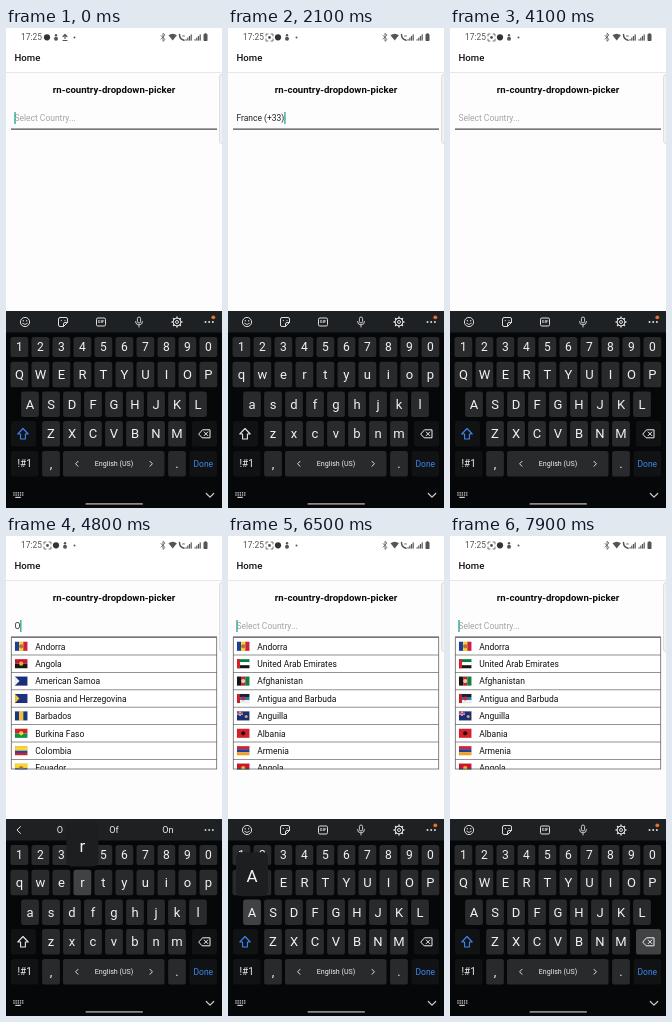
Animation of 216x480 px, one loop 8 s. Source, as an HTML page:

```html
<!DOCTYPE html>
<html lang="en">
<head>
<meta charset="utf-8">
<title>Country picker</title>
<style>
html, body { margin: 0; width: 100%; height: 100%; overflow: hidden; background: #fff; }
svg { display: block; width: 216px; height: 480px; font-family: Roboto, "Noto Sans", sans-serif; }
</style>
</head>
<body>
<svg id="stage" viewBox="0 0 216 480"></svg>
<script>
const LOOP = 8000;
const stage = document.getElementById('stage');
const pen = document.createElement('canvas').getContext('2d');

// Flags: direction, stripe colours, then marks: * disc, + cross, < hoist triangle, | hoist bar
const COUNTRIES = [
  ['Andorra', 'v 1a3fa0 f7d51d d02040 *b8703c'],
  ['United Arab Emirates', 'h 00843d ffffff 151515 |d8202c'],
  ['Afghanistan', 'v 151515 c8202c 10803c *e8c8b8'],
  ['Antigua and Barbuda', 'h 202028 2878b8 f0f0f0 |c8202c *b83040'],
  ['Anguilla', 'h 182f78 jack .e8a050'],
  ['Albania', 'h d8202c *281010'],
  ['Armenia', 'h d8202c 2040a0 f0a020'],
  ['Angola', 'h cc1530 181818 *e8b030'],
  ['Antarctica', 'h 3a9ad8 *ffffff'],
  ['Argentina', 'h 78b4e0 ffffff 78b4e0 *f0b840'],
  ['American Samoa', 'h 182f78 <f0f0f0'],
  ['Bosnia and Herzegovina', 'h 203080 <f0c820'],
  ['Barbados', 'v 183878 f0c030 183878'],
  ['Burkina Faso', 'h d8202c 109048 *f0d030'],
  ['Central African Republic', 'h 183878 ffffff 289040 f0d030'],
  ['Switzerland', 'h d8202c +ffffff'],
  ['Colombia', 'h f7d020 f7d020 2040a0 d0202c'],
  ['Ecuador', 'h f7d51d f7d51d 2050b0 d8202c *a87848'],
  ['Finland', 'h ffffff +203080'],
  ['Fiji', 'h 68b8e0 jack .ffffff'],
  ['Falkland Islands (Malvinas)', 'h 182f78 jack .ffffff'],
  ['France', 'v 2048a0 ffffff e02838'],
  ['United Kingdom of Great Britain and Northern Ireland', 'h 203080 +ffffff ~d8203c'],
  ['Georgia', 'h ffffff +e02030'],
  ['French Guiana', 'v 2048a0 ffffff e02838'],
  ['Equatorial Guinea', 'h 309a30 ffffff d8202c <2870c0'],
  ['South Georgia and the South Sandwich Islands', 'h 182f78 jack .b0c0a0'],
  ['British Indian Ocean Territory', 'h c8c8c8 ?'],
  ['South Africa', 'h d8303c 108050 203080 <181818']
];

const SUGGEST = {
  A: ['A', 'And', 'Abe'], An: ['An', 'And', 'Any'], Anc: ['Anc', 'Ancient', 'Anchor'],
  Ance: ['Ance', 'Ancestor', 'Ancestry'], And: ['And', 'Andy', 'Android'],
  Ando: ['Andorra', '@flag', ''], F: ['F', 'For', 'From'], Fr: ['Fr', 'From', 'Friday'],
  Fran: ['Fran', 'France', 'Frank'], Franc: ['Franc~e', 'France~s', 'Fran~c'],
  France: ['France', 'Frances', 'French'], O: ['O', 'Of', 'On'], Or: ['Or', 'Order', 'Ort']
};

const PICKED = 'France (+33)';
// time, text, caret, pressed key, list closed, words shown instead
const STEPS = [
  [0, '', 1, '', 1], [100, '', 0, '', 1],
  [800, '', 1, 'a', 1], [900, 'A', 1, ''], [1000, 'A', 1, 'n'],
  [1100, 'An', 1, '', 0, SUGGEST.A], [1200, 'An', 1, 'c', 0, ['A~ ', 'And', 'Abe~r']],
  [1300, 'Anc', 1, ''], [1400, 'Anc', 1, 'e'], [1500, 'Ance', 1, ''],
  [2000, PICKED, 1, '', 1], [2600, PICKED, 0, '', 1],
  [2900, 'France (+3', 1, '<'], [3000, 'France (', 1, '<'], [3100, 'France', 1, '<'],
  [3200, 'Franc', 1, '<'], [3300, 'Fran', 1, '<'], [3400, 'Fr', 1, '<'], [3500, 'F', 1, '<'],
  [3600, '', 1, '<', 1], [3800, '', 1, '', 1], [4100, '', 0, '', 1],
  [4500, '', 1, 'o', 1], [4600, 'O', 1, ''], [4800, 'O', 1, 'r'], [4900, 'Or', 1, ''],
  [5700, 'Or', 0, ''], [6000, 'Or', 1, '<'], [6100, 'O', 1, '<'], [6200, '', 1, '<'],
  [6300, '', 1, ''], [6500, '', 1, 'a'], [6600, 'A', 1, ''], [6700, 'A', 1, 'n'],
  [6800, 'An', 1, ''], [6900, 'An', 1, 'd'], [7000, 'And', 1, ''], [7100, 'And', 1, 'o'],
  [7200, 'Ando', 1, ''], [7400, 'And', 1, '<'], [7500, 'An', 1, '<'], [7600, 'A', 1, '<'],
  [7700, '', 1, '<']
];

const rect = (x, y, w, h, fill, more = '') =>
  `<rect x="${x}" y="${y}" width="${w}" height="${h}" fill="${fill}" ${more}/>`;
const disc = (x, y, r, fill) => `<circle cx="${x}" cy="${y}" r="${r}" fill="${fill}"/>`;
const line = (d, color, w = 1, fill = 'none') =>
  `<path d="${d}" fill="${fill}" stroke="${color}" stroke-width="${w}" stroke-linecap="round" stroke-linejoin="round"/>`;
const label = (s, x, cy, size, fill, anchor = 'start', more = '') =>
  `<text x="${x}" y="${cy + size * .355}" font-size="${size}" fill="${fill}" text-anchor="${anchor}" xml:space="preserve" ${more}>${s}</text>`;

function widthOf(s, size) {
  pen.font = `${size}px Roboto, "Noto Sans", sans-serif`;
  return pen.measureText(s).width;
}

function cross(x, y, w, h, color, t) {
  return rect(x + w / 2 - t / 2, y, t, h, color) + rect(x, y + h / 2 - t / 2, w, t, color);
}

function flag(spec, x, cy) {
  const w = 12.4, h = 9, y = cy - h / 2, parts = spec.split(' ');
  const bands = parts.filter(p => /^[0-9a-f]{6}$/.test(p));
  const n = bands.length;
  let out = bands.map((c, i) => parts[0] === 'v'
    ? rect(x + i * w / n, y, w / n, h, '#' + c)
    : rect(x, y + i * h / n, w, h / n, '#' + c)).join('');
  for (const p of parts.slice(1)) {
    const c = '#' + p.slice(1);
    if (p === 'jack') out += cross(x, y, 6, 4.5, '#fff', 1.8) + cross(x, y, 6, 4.5, '#d8203c', .8);
    else if (p[0] === '*') out += disc(x + w / 2, cy, 2.1, c);
    else if (p[0] === '.') out += disc(x + 9.2, cy + .5, 1.5, c);
    else if (p[0] === '+') out += cross(x, y, w, h, c, 2.4);
    else if (p[0] === '~') out += line(`M${x} ${y}l${w} ${h}m0 ${-h}l${-w} ${h}`, '#fff', .8) + cross(x, y, w, h, c, 1.3);
    else if (p[0] === '<') out += `<path d="M${x} ${y}l4.5 4.5l-4.5 4.5z" fill="${c}"/>`;
    else if (p[0] === '|') out += rect(x, y, 3, h, c);
    else if (p === '?') out += label('?', x + w / 2, cy, 7, '#777', 'middle');
  }
  return out + rect(x, y, w, h, 'none', 'stroke="#0002" stroke-width=".4"');
}

function statusBar(t) {
  const g = '#555', late = t >= 200;
  const x = late ? 50 : 41;
  let out = label('17:25', 15, 9.5, 8.4, g);
  if (late) out += line('M38 8v-2h2m3 0h2v2m0 3v2h-2m-3 0h-2v-2', g, .8) + disc(41.5, 9.5, 1.4, g);
  out += disc(x, 9.3, 3.1, '#333');
  out += disc(x + 9, 7.2, 1.2, g) + disc(x + 9, 10.7, 2, g);
  if (!late) out += line('M59 10.5v-4m-2 2l2-2l2 2M57 12.5h4', g, 1.2);
  out += disc(68.5, 9.5, 1, g);
  out += line('M155 7.5l4 4l-2 1.8v-8l2 1.8l-4 4', g, .8);
  out += `<path d="M162.5 7.3q4.2-3.3 8.4 0l-4.2 5.2z" fill="${g}"/>`;
  out += line('M173.5 6.5q0 4.5 4.5 5.8', g, 1.5) + label('w', 176, 7.5, 4, g);
  const bars = bx => [0, 1, 2, 3].map(i => rect(bx + i * 1.7, 11.2 - i * 1.6, 1.2, 1.4 + i * 1.6, g)).join('');
  out += bars(179.5) + bars(188.5);
  return out + rect(197.5, 6, 4, 7, g, 'rx=".7"') + rect(198.6, 5.2, 1.8, 1, g);
}

function countryList(text) {
  const top = 101.6, bottom = 233;
  const rows = COUNTRIES.filter(c => c[0].toLowerCase().includes(text.toLowerCase()));
  if (!rows.length) return '';
  let y = top, out = '';
  for (const [name, spec] of rows) {
    if (y >= bottom - 1) break;
    const cut = name.length > 46 ? name.lastIndexOf(' ') : name.length;
    const two = cut < name.length, h = two ? 27.2 : 17.4;
    out += flag(spec, 9, y + h / 2) + label(name.slice(0, cut), 29.2, y + 9, 8.5, '#111');
    if (two) out += label(name.slice(cut + 1), 29.2, y + 19, 8.5, '#111');
    y += h;
    out += rect(5, y - .4, 206, .8, '#777');
  }
  const end = Math.min(y, bottom);
  return `<clipPath id="box"><rect x="4" y="101" width="208" height="${end - 100.5}"/></clipPath>`
    + `<g clip-path="url(#box)">${rect(5, top, 206, end - top, '#fff')}${out}</g>`
    + rect(5.3, top, 205.4, end - top, 'none', 'stroke="#666" stroke-width=".8"');
}

function field(text, caret, closed) {
  const size = 8.5, x = 8.4, w = widthOf(text, size);
  let out = text ? label(text, x, 90, size, '#222') : label('Select Country...', x, 90, size, '#a4a4a4');
  if (text === 'An' || text === 'Or') out += rect(x, 94.2, w, .7, '#222');
  if (caret) out += rect(x + w, 84, 1.2, 12, '#159a8c');
  out += rect(5, 100.6, 206, 1, '#222');
  return closed ? out : out + countryList(text);
}

function iconBar() {
  const c = '#ddd';
  const ring = (x, r) => `<circle cx="${x}" cy="294" r="${r}" fill="none" stroke="${c}" stroke-width="1"/>`;
  const teeth = Array.from({ length: 8 }, (_, i) => {
    const a = i * Math.PI / 4;
    return `M${171 + 4 * Math.cos(a)} ${294 + 4 * Math.sin(a)}L${171 + 5 * Math.cos(a)} ${294 + 5 * Math.sin(a)}`;
  }).join('');
  return ring(19, 4.6) + disc(17.3, 292.7, .7, c) + disc(20.7, 292.7, .7, c) + line('M16.6 295.4q2.4 2.5 4.8 0', c, .9)
    + line('M54 289.5h6q1.5 0 1.5 1.5v3.5l-4 4h-3.5q-1.5 0-1.5-1.5v-6q0-1.5 1.5-1.5M61.5 294.5h-2.5q-1.5 0-1.5 1.5v2.5', c)
    + disc(55.3, 292.6, .6, c) + disc(59, 292.6, .6, c)
    + rect(90.5, 290, 9, 8, 'none', `rx="1.3" stroke="${c}"`) + label('GIF', 95, 294, 4.2, c, 'middle', 'font-weight="700"')
    + rect(131.4, 289, 3.2, 6, 'none', `rx="1.6" stroke="${c}" stroke-width=".9"`)
    + line('M129.5 293.5q0 3.4 3.5 3.4t3.5-3.4M133 297v2', c, .9)
    + ring(171, 4) + ring(171, 1.5) + line(teeth, c, 1.4)
    + dots(c) + disc(207.3, 289.3, 1.9, '#e8702a');
}

const dots = c => [199.5, 203.2, 206.9].map(x => disc(x, 294, 1, c)).join('');

function wordBar(words) {
  let out = line('M14.5 290.5l-3.5 3.5l3.5 3.5', '#ddd');
  words.forEach((word, i) => {
    const x = 54 + 54 * i;
    if (word === '@flag') out += flag(COUNTRIES[0][1], x - 6.2, 294);
    else {
      const [main, tail = ''] = word.split('~');
      const size = main === 'Fran' && tail === 'c' ? 7 : 9.1;
      out += label(`${main}<tspan fill="#666">${tail}</tspan>`, x, 294, size, '#eee', 'middle');
    }
  });
  return out + dots(words[2] ? '#ccc' : '#4a4d50');
}

function keyboard(text, pressed, words) {
  const caps = !text, KEY = '#282a2c', DOWN = '#404244', DARK = '#101214';
  const cap = (x, y, w, h, fill) => rect(x, y, w, h, fill, 'rx="2.6"');
  let out = rect(0, 283, 216, 197, '#060708') + rect(0, 283, 216, 21.5, '#1d2124');
  out += words ? wordBar(words) : iconBar();
  let popup = '';
  const row = (chars, x0, cy, h, size) => [...chars].forEach((ch, i) => {
    const x = x0 + 21 * i, down = ch === pressed, s = caps ? ch.toUpperCase() : ch;
    out += cap(x - 8.9, cy - h / 2, 17.8, h, down ? DOWN : KEY) + label(s, x, cy, size, '#f2f2f2', 'middle');
    if (down) popup = rect(x - 16, cy - 60, 32, 44, '#1c1e20', 'rx="5"') + label(s, x, cy - 36.5, 17, '#f2f2f2', 'middle');
  });
  row('1234567890', 13.4, 319, 20, 12);
  row('qwertyuiop', 13.4, 346.5, 25.5, 13);
  row('asdfghjkl', 24, 376.2, 25.5, 13);
  row('zxcvbnm', 45, 405.8, 25.5, 13);
  out += cap(5, 393, 25, 25.5, DARK);
  out += line('M17 400.5l-5.2 5.5h2.8v5h4.8v-5h2.8z', caps ? '#3f86ee' : '#e6e6e6', 1.1);
  out += cap(186, 393, 25, 25.5, pressed === '<' ? DOWN : DARK);
  out += line('M193 405.8l3.5-4h7.5v8h-7.5zM198.2 404l3.6 3.6m0-3.6l-3.6 3.6', '#eee', 1);
  out += cap(5, 423, 27.5, 25.5, DARK) + label('!#1', 18.7, 435.8, 10, '#eee', 'middle');
  out += cap(36.1, 423, 17.8, 25.5, KEY) + label(',', 45, 435.8, 13, '#eee', 'middle');
  out += cap(57, 423, 101.5, 25.5, KEY) + label('English (US)', 108, 435.8, 7.1, '#eee', 'middle');
  out += line('M72 433.3l-2.4 2.5l2.4 2.5M144 433.3l2.4 2.5l-2.4 2.5', '#ddd');
  out += cap(162.1, 423, 17.8, 25.5, KEY) + label('.', 171, 435.8, 13, '#eee', 'middle');
  out += cap(183.5, 423, 27.5, 25.5, DARK) + label('Done', 197.3, 435.8, 8.5, '#3f86ee', 'middle');
  for (let i = 0; i < 10; i++) out += rect(7.3 + (i % 5) * 2.2, 464.2 + (i > 4) * 2.2, 1.3, 1.3, '#ccc');
  out += rect(9.3, 468.8, 5.5, 1.2, '#ccc') + line('M200.3 465.5l3.7 3.7l3.7-3.7', '#ccc', 1.2);
  return out + rect(79.5, 475, 57.5, 1.8, '#8a8a8a', 'rx=".9"') + popup;
}

function render(t) {
  const [, text, caret, pressed, closed, shown] = STEPS.filter(s => s[0] <= t).pop();
  stage.innerHTML = rect(0, 0, 216, 480, '#fff') + statusBar(t)
    + label('Home', 8.5, 30, 9.6, '#111', 'start', 'font-weight="500"')
    + rect(0, 44, 216, .8, '#dadada') + rect(0, 44.8, 216, 239, '#fdfdfd')
    + rect(213.6, 46.5, 6, 69, '#f2f2f2', 'rx="2.4" stroke="#d4d4d4" stroke-width=".8"')
    + label('rn-country-dropdown-picker', 108, 61.5, 9.6, '#0a0a0a', 'middle', 'font-weight="700"')
    + field(text, caret, closed)
    + keyboard(text, pressed, shown || SUGGEST[text]);
}

const start = performance.now();
let last = -1;
function tick() {
  const step = Math.floor(((performance.now() - start) % LOOP) / 100);
  if (step !== last) render((last = step) * 100);
  requestAnimationFrame(tick);
}
tick();
</script>
</body>
</html>
```
